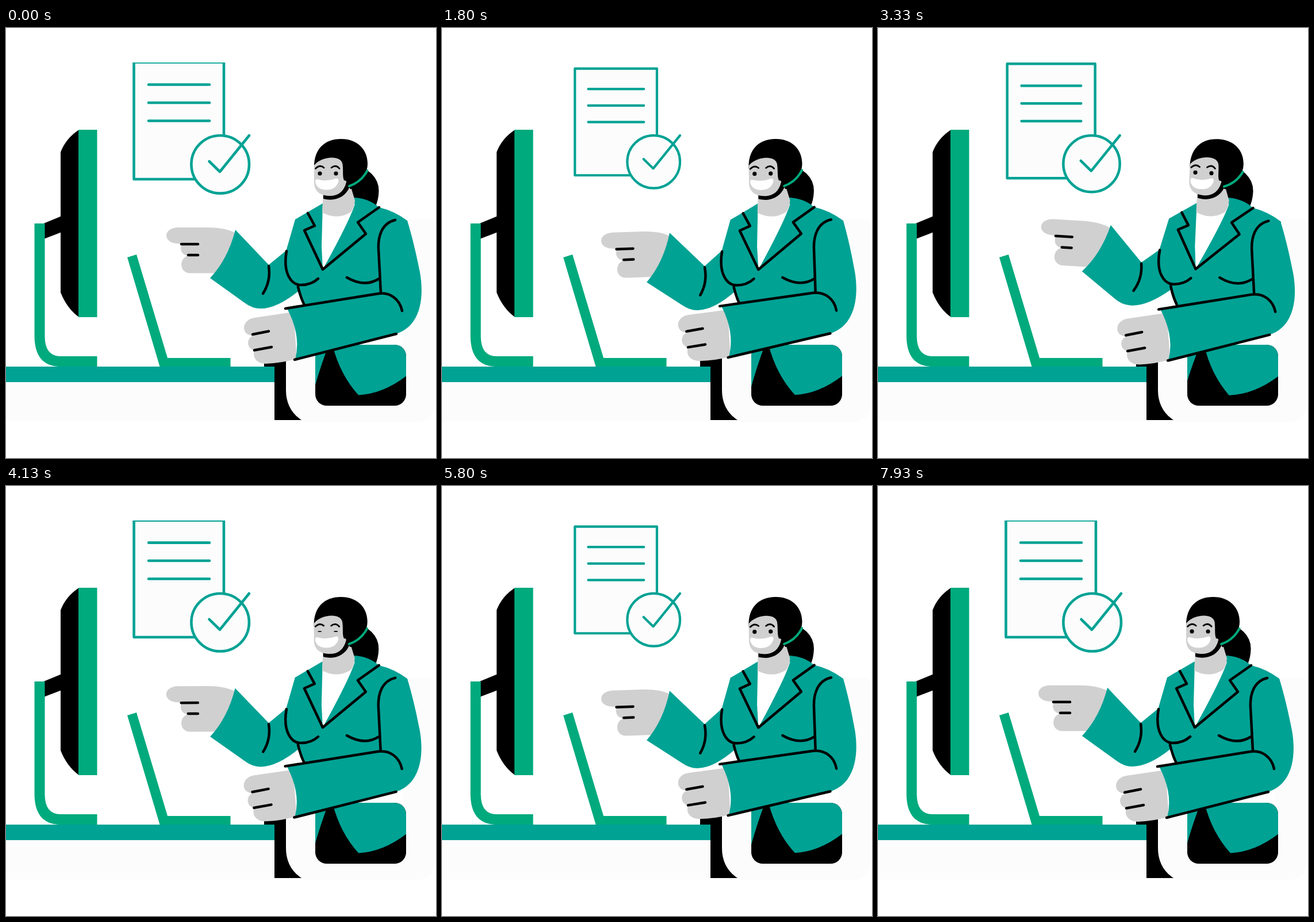
Write an HTML page that moves like this. It is 748 by 748 pixels and loops after 7.99 s.

```html
<!DOCTYPE html>
<html lang="en">
<head>
<meta charset="utf-8">
<title>Desk work</title>
<style>
  html, body { margin: 0; width: 100%; height: 100%; overflow: hidden; background: #fff; }
  svg { display: block; width: 100%; height: 100%; }
  .teal { fill: #00a294; }
  .green { fill: #00aa7d; }
  .skin { fill: #d0d0d0; }
  .pale { fill: #fcfcfc; }
  .ink { fill: none; stroke: #000; stroke-width: 4.5; stroke-linecap: round; stroke-linejoin: round; }
  .pen { stroke: #00a294; stroke-width: 4.6; stroke-linecap: round; stroke-linejoin: round; }
</style>
</head>
<body>
<svg viewBox="0 0 748 748">
  <defs>
    <clipPath id="top"><rect y="60" width="748" height="688"/></clipPath>
    <clipPath id="hole"><rect x="538" y="551" width="158" height="106" rx="20"/></clipPath>
  </defs>

  <!-- document -->
  <g clip-path="url(#top)">
    <g id="doc">
      <rect class="pale pen" x="222.5" y="59.5" width="156.500" height="203.5"/>
      <path class="pen" d="M248 98.5H354M248 130H354M248 161.5H354"/>
      <circle class="pale pen" cx="372.7" cy="237.300" r="50.3"/>
      <path class="pen" fill="none" d="M353.5 232L372 250L423 187"/>
    </g>
  </g>

  <!-- desk, leg and chair -->
  <rect class="pale" y="616" width="467" height="69"/>
  <path d="M449 562H500V589H449ZM467 580H516V682H467Z"/>
  <path class="pale" d="M690 333H737Q746 333 746 345V655Q744 686 712 686H520L514 682C496 670 487 652 487 630V560H690Z"/>
  <g clip-path="url(#hole)">
    <rect x="530" y="540" width="180" height="125"/>
    <g id="hem" class="teal">
      <path d="M567 548Q580 602 613 638.5Q660 636 704 599V535H560Z"/>
      <path d="M526 535H568Q550 578 536 628L526 620Z"/>
    </g>
  </g>
  <rect class="teal" y="589" width="467" height="27"/>

  <!-- computers -->
  <path d="M63 341L97 327V355L63 368Z"/>
  <path d="M127 177Q104 192 95 216V460Q106 488 127 503Z"/>
  <rect class="green" x="126" y="177" width="32.5" height="326"/>
  <path class="green" d="M49.5 340H67.5V535Q67 571 95 571H158.5V589H92Q49.5 587 49.5 535Z"/>
  <path class="green" d="M211 399L227 394L281 574H390.5V589H267.5Z"/>

  <!-- woman: limbs and head turn inside the leaning body -->
  <g id="body">
    <g id="forearm">
      <g id="hand">
        <path class="skin" d="M398 356Q380 347 350 347H300C272 347 272 375 300 375L306 376C301 386 307 395 316 396C300 402 302 426 320 426.5H364L396 400Z"/>
        <path class="ink" d="M305 376H334M317 395H334"/>
      </g>
      <path class="teal" d="M399 351L457 412L490 385L512 455Q472 488 443 488Q428 488 415 478L355 435Q386 402 399 351Z"/>
      <path class="ink" d="M457 414Q461 440 447 462"/>
    </g>

    <path d="M622 244Q649 258 648.5 284Q648 300 642 312L612 312L597 277Z"/>

    <path class="teal" d="M503 333L551 305L607 295Q632 297 649 312Q675 318 698 335L690 500L545 520L519 482L508 450Q480 438 488 385Z"/>
    <path fill="#fff" d="M551 305L549 380L551 420Q598 335 607 306Z"/>
    <path class="skin" d="M552 280H601L607 300Q606 312 600 320Q576 335 550 321Z"/>
    <path class="ink" d="M525 322L537 344L519 352L551 420L626 358L612 338L649 312"/>
    <path class="ink" d="M488 388C481 428 497 447 513 447Q531 447 543 436M593 434Q624 452 649 436M508 450Q512 468 519 482"/>

    <g id="head">
      <path d="M536 244C535 212 553 193 583 193C611 193 629 211 629 236C629 256 614 272 598 276C590 296 570 302 552 297V280Z"/>
      <path class="skin" d="M536 239C548 223 583 220 585.5 237C587 250 585 258 588 265C591 266 592 265 592 268C588 285 577 293 561 292C545 291 536 283 536 268Z"/>
      <path fill="none" stroke="#00aa7d" stroke-width="4" stroke-linecap="round" d="M597 275Q618 268 628.5 248"/>
      <path fill="none" stroke="#000" stroke-width="2.8" stroke-linecap="round" d="M538.5 244.5Q546 237 553 243M566 243Q574 237 580 244.5"/>
      <g id="eyes"><circle cx="546" cy="253" r="3.6"/><circle cx="574" cy="253" r="3.6"/></g>
      <path fill="#fff" d="M541 263Q557 268 574 262Q579 261 578.5 267C575 278 567 281.5 557 281.5C547 281.5 540 277 538 268Q538 263 541 263Z"/>
    </g>

    <g id="arm">
      <path class="skin" d="M500 494L432 504C414 507 410 523 418 531Q423 535 429 535C418 541 418 557 432 561C428 573 436 584 452 584Q480 583 506 575Z"/>
      <path class="ink" d="M429 533L457 527.5M432 560.5L462 555"/>
      <path class="teal" d="M489 488L652 461L648 385Q648 345 677 332L698 335C708 368 714 395 720 425C728 470 721 518 679 532L503 577Q514 535 489 488Z"/>
      <path class="ink" d="M677 334C652 340 647 365 648 385L652 461M486 488L648 462C668 459 685 472 689 492M502 577L679 532"/>
    </g>
  </g>
</svg>
<script>
  const LOOP = 7990, CYCLE = 4000, FIRST = 130, PAIR = 200;
  const $ = id => document.getElementById(id);
  const ease = p => (1 - Math.cos(Math.PI * p)) / 2;

  // Pivot of each joint and its turn in degrees at the full lean forward and back.
  const lean = { x: 590, y: 510, forward: -1.3, back: 1.35 };
  const joints = {
    body: lean,
    hem: lean,
    head: { x: 577, y: 300, forward: -1.7, back: 2.3 },
    forearm: { x: 490, y: 400, forward: -7.6, back: 4.2 },
    hand: { x: 377, y: 393, forward: 2.5, back: -1 },
    arm: { x: 682, y: 381, forward: 4.6, back: -1.3 }
  };

  // -1 is the full lean forward at 1 s, +1 the full lean back at 3 s.
  function swing(t) {
    if (t < 1000) return -ease(t / 1000);
    if (t < 3000) return 2 * ease((t - 1000) / 2000) - 1;
    return 1 - ease((t - 3000) / 1000);
  }

  function scale(id, x, y, sx, sy) {
    $(id).setAttribute("transform",
      `translate(${x} ${y}) scale(${sx} ${sy}) translate(${-x} ${-y})`);
  }

  function draw(time) {
    const t = time % CYCLE;
    const s = swing(t);

    for (const [id, { x, y, forward, back }] of Object.entries(joints)) {
      const turn = Math.abs(s) * (s < 0 ? forward : back);
      $(id).setAttribute("transform", `rotate(${turn} ${x} ${y})`);
    }

    const size = 0.955 + 0.045 * Math.cos(2 * Math.PI * t / CYCLE);
    scale("doc", 321, 186, size, size);

    const blink = t >= 100 && t < 300;
    scale("eyes", 560, 253, 1, blink ? 0.25 : 1);
  }

  // The picture is held for 130 ms and 70 ms in turn.
  const start = performance.now();
  function tick(now) {
    const t = Math.max(0, now - start) % LOOP;
    const rest = t % PAIR;
    draw(t - rest + (rest >= FIRST ? FIRST : 0));
    requestAnimationFrame(tick);
  }
  draw(0);
  requestAnimationFrame(tick);
</script>
</body>
</html>
```
